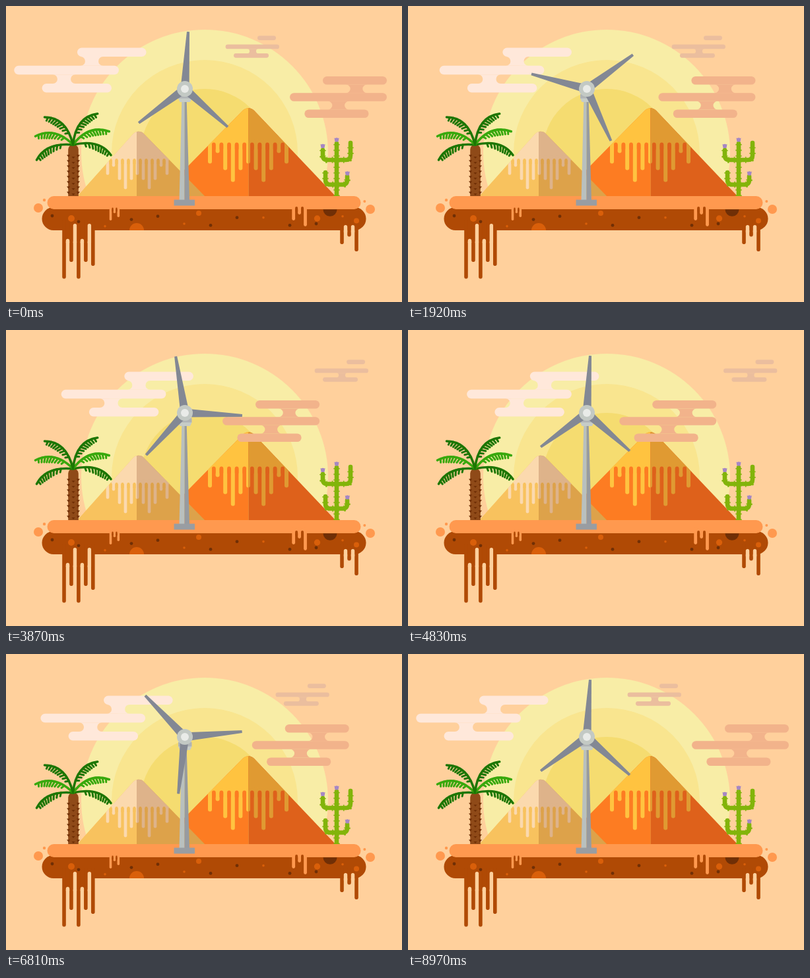
An HTML page with a canvas that plays this animation: 600 px wide and 450 px high, repeating every 9 s.

```html
<!DOCTYPE html>
<html lang="en">
<head>
<meta charset="utf-8">
<title>Desert wind turbine</title>
<style>
html, body { margin: 0; width: 100%; height: 100%; overflow: hidden; background: #ffd09c; }
canvas { display: block; }
</style>
</head>
<body>
<canvas id="stage" width="600" height="450"></canvas>
<script>
const c = document.getElementById('stage').getContext('2d');
const TAU = Math.PI * 2;
const SKY = '#ffd09c', SOIL = '#b04a05', SAND = '#ff994f', EMBER = '#d95f0a', DARK = '#702f06';

function disc(x, y, r, color, from = 0, to = TAU) {
  c.fillStyle = color;
  c.beginPath();
  c.arc(x, y, r, from, to);
  c.fill();
}

function box(x0, y0, x1, y1, r, color) {
  c.fillStyle = color;
  c.beginPath();
  c.roundRect(x0, y0, x1 - x0, y1 - y0, r);
  c.fill();
}

// vertical bar with round ends
function bar(x, w, y0, y1, color) {
  box(x - w / 2, y0, x + w / 2, y1, w / 2, color);
}

// evenly spaced bars hanging from one height
function drips(x, pitch, w, top, ends, color) {
  ends.forEach((end, i) => bar(x + i * pitch, w, top, end, color));
}

// evenly spaced bars cut upwards, to a height that may depend on the index
function gaps(x, pitch, w, count, top, bottom, color) {
  for (let i = 0; i < count; i++) bar(x + i * pitch, w, top(i), bottom, color);
}

function poly(points, color) {
  c.fillStyle = color;
  c.beginPath();
  for (const [x, y] of points) c.lineTo(x, y);
  c.fill();
}

function clipped(x0, y0, x1, y1, paint) {
  c.save();
  c.beginPath();
  c.rect(x0, y0, x1 - x0, y1 - y0);
  c.clip();
  paint();
  c.restore();
}

function sun() {
  clipped(0, 0, 600, 295, () => {
    disc(301, 223, 187, '#f8eda6');
    disc(301, 223, 141, '#f9e58f');
    disc(301, 223, 97, '#f5dc70');
  });
}

// snow drip lengths from the middle outwards, for the large mountain
const DEPTHS = [32, 42, 60, 42, 16, 32];

function mountain(m) {
  const k = m.pitch / 11.6, w = 6 * k, first = m.mid - 5 * m.pitch;
  const ends = Array.from({ length: 11 }, (_, i) => m.snow + k * DEPTHS[Math.abs(i - 5)]);
  c.save();
  c.beginPath();
  c.moveTo(m.left, 292);
  c.arcTo(m.x, m.top, m.right, 292, m.round);
  c.lineTo(m.right, 292);
  c.clip();
  [[0, m.split], [m.split, 600]].forEach(([x0, x1], side) => clipped(x0, 0, x1, 300, () => {
    const body = m.body[side], cap = m.cap[side];
    box(0, 0, 600, 300, 0, body);
    box(0, 0, 600, m.snow + w / 2, 0, cap);
    drips(first, m.pitch, w, m.snow - 5, ends, cap);
    gaps(first + m.pitch / 2, m.pitch, m.pitch - w, 10, () => m.snow, m.snow + 2 * w, body);
  }));
  c.restore();
}

// three stacked bars; a waist at each given x joins a bar to the next
function cloud(dx, color, y, pitch, spans, waists) {
  const h = pitch / 4, half = pitch * .37, q = Math.PI / 2;
  c.save();
  c.translate(dx, 0);
  spans.forEach(([x0, x1], i) => {
    const top = y + i * pitch, low = top + 2 * h, mid = low + h;
    box(x0, top, x1, low, h, color);
    if (!waists[i]) return;
    const l = waists[i] - half - h, r = waists[i] + half + h;
    c.beginPath();
    c.arc(l, mid, h, -q, q);
    c.lineTo(r, mid + h);
    c.arc(r, mid, h, q, 3 * q);
    c.fill();
  });
  c.restore();
}

function clouds(u) {
  cloud(83 * u, '#ffe8da', 63.5, 27.2, [[108, 212.5], [12.3, 171], [54.5, 160]], [130, 88]);
  cloud(157 * u, '#ebbe9e', 45.2, 13.4, [[381, 409], [332.6, 414], [345, 398]], [0, 374]);
  cloud(-118.5 * u, '#f2b38b', 107, 25.2, [[480, 577], [430, 577], [452.3, 549.5]], [531, 503.7]);
}

function ground() {
  box(54.5, 306, 545.5, 341, 17.5, SOIL);
  box(62.5, 289, 537.5, 309, 10, SAND);

  drips(158.5, 5.9, 3.6, 302, [326, 315, 321], SAND);
  gaps(161.5, 5.9, 2.4, 2, () => 306.5, 313, SOIL);
  drips(435.7, 8.9, 4.8, 300, [326, 317, 335], SAND);
  gaps(440.1, 8.9, 4, 2, () => 305, 314, SOIL);

  box(88, 335, 131, 358, 0, SOIL);
  drips(88, 10.95, 5.6, 325, [414.5, 389, 414.5, 389, 395], SOIL);
  gaps(93.5, 10.95, 5.4, 4, i => i % 2 ? 331 : 354, 362, SKY);
  drips(509, 11, 5.6, 325, [362, 350.5, 373], SOIL);
  gaps(514.5, 11, 5.4, 2, () => 333, 346, SKY);

  for (let i = 0; i < 12; i++) {
    const ember = i % 3 === 2;
    disc(70 + 40 * i, 327 - 8 * Math.cos(i * TAU / 3.75), ember ? 1.8 : 2.4, ember ? EMBER : DARK);
  }
  [[99, 323, 5], [292, 315, 4], [471.5, 323, 4.7], [531, 326.5, 4]].forEach(s => disc(...s, EMBER));
  disc(198, 341, 11, EMBER, Math.PI, TAU);
  disc(491, 309.3, 10.5, DARK, 0, Math.PI);
  [[49, 307, 7], [58, 295, 2.2], [552, 309, 7], [543.3, 297, 2]].forEach(s => disc(...s, SAND));
}

// frond from the crown at 0,0 to the left, leaflets on the underside
function frond(tx, ty, cx, cy, color) {
  c.strokeStyle = color;
  c.lineCap = 'round';
  c.lineWidth = 3.6;
  c.beginPath();
  c.moveTo(0, 0);
  c.quadraticCurveTo(cx, cy, tx, ty);
  c.stroke();
  c.lineWidth = 3;
  c.beginPath();
  for (let i = 0; i < 9; i++) {
    const t = .24 + i * .085, s = 1 - t;
    const x = 2 * s * t * cx + t * t * tx, y = 2 * s * t * cy + t * t * ty;
    const a = Math.atan2(s * cy + t * (ty - cy), s * cx + t * (tx - cx)) - 1.25;
    const len = 4 + 5 * Math.sin(Math.PI * (i + 1) / 10);
    c.moveTo(x, y);
    c.lineTo(x + len * Math.cos(a), y + len * Math.sin(a));
  }
  c.stroke();
}

function crown() {
  frond(-55, 23, -41, -4, '#1d7604');
  frond(-57, -13, -27, -28, '#38a80d');
  frond(-43, -42, -10, -42, '#1d7604');
}

function palm() {
  box(94.2, 211, 109.8, 289, [7, 7, 0, 0], '#8f4a18');
  for (let y = 226; y < 287; y += 8) {
    for (const s of [-1, 1]) {
      const x = 102 + 7 * s;
      poly([[x - 2 * s, y], [x + 3 * s, y + .5], [x, y + 4]], DARK);
    }
    poly([[99.5, y + 3], [104.5, y + 3], [102, y + 6]], DARK);
  }
  c.save();
  c.translate(101.5, 211);
  crown();
  c.rotate(-.13);
  c.scale(-1, 1);
  crown();
  c.restore();
}

function cactus() {
  const p = new Path2D('M501 289V209M480 219V227Q480 234 487 234H515Q522 234 522 227V208' +
    'M484 253V264Q484 271.500 491 271.500H510Q517 271.500 517 264V259');
  c.strokeStyle = '#82b40a';
  c.lineCap = 'butt';
  c.lineWidth = 9.4;
  c.setLineDash([1.6, 7]);
  c.stroke(p);
  c.setLineDash([]);
  c.lineCap = 'round';
  c.lineWidth = 6.6;
  c.stroke(p);
  for (const [x, y] of [[480, 213], [501, 203.5], [517.3, 254.5]]) {
    poly([[x - 3.6, y - 3], [x, y - 1.5], [x + 3.6, y - 3], [x + 2.4, y + 3], [x - 2.4, y + 3]], '#a687c4');
    disc(x, y - .5, 2.8, '#a687c4');
  }
}

function turbine(turn) {
  poly([[266.3, 144], [270.5, 144], [270.5, 296], [262.5, 296]], '#b9c0be');
  poly([[270.5, 144], [273.7, 144], [278, 296], [270.5, 296]], '#979ba0');
  box(254.5, 294.5, 286, 303.5, 0, '#999da2');
  box(261, 134, 281.5, 141, 0, '#b0b4b6');
  poly([[261, 140.5], [281.5, 140.5], [279, 146], [263.5, 146]], '#c6ccc7');

  for (const deg of [3.3, 131.7, 233.5]) {
    c.save();
    c.translate(271, 126);
    c.rotate(turn + deg * TAU / 360);
    poly([[-2, -87], [2, -87], [6.2, -8], [-6.2, -8]], '#838894');
    c.restore();
  }
  disc(271, 126, 12, '#c3c9c4');
  disc(271, 126, 6, '#e9ebe8');
}

const FRAME = 30, COUNT = 300, SPIN = 23;
const LARGE = {
  left: 228, right: 502, x: 367.5, top: 150, round: 12, split: 367.5, mid: 367, pitch: 11.6,
  snow: 207.5, body: ['#fd7c22', '#de611b'], cap: ['#ffc340', '#e09a32']
};
const SMALL = {
  left: 105.5, right: 304, x: 200.5, top: 185.5, round: 11, split: 198, mid: 199, pitch: 9,
  snow: 232, body: ['#f8c25e', '#dda24a'], cap: ['#fbd9ae', '#deb38a']
};

function draw(n) {
  // clouds drift out, rest briefly and drift back
  const u = Math.min(n / 150, (299 - n) / 149, .984);
  box(0, 0, 600, 450, 0, SKY);
  sun();
  mountain(LARGE);
  mountain(SMALL);
  clouds(u);
  cactus();
  palm();
  ground();
  turbine(n % SPIN / SPIN * TAU);
}

const start = performance.now();

function tick() {
  const t = performance.now() - start + .5;
  draw(Math.floor(t / FRAME) % COUNT);
  requestAnimationFrame(tick);
}
tick();
</script>
</body>
</html>
```
